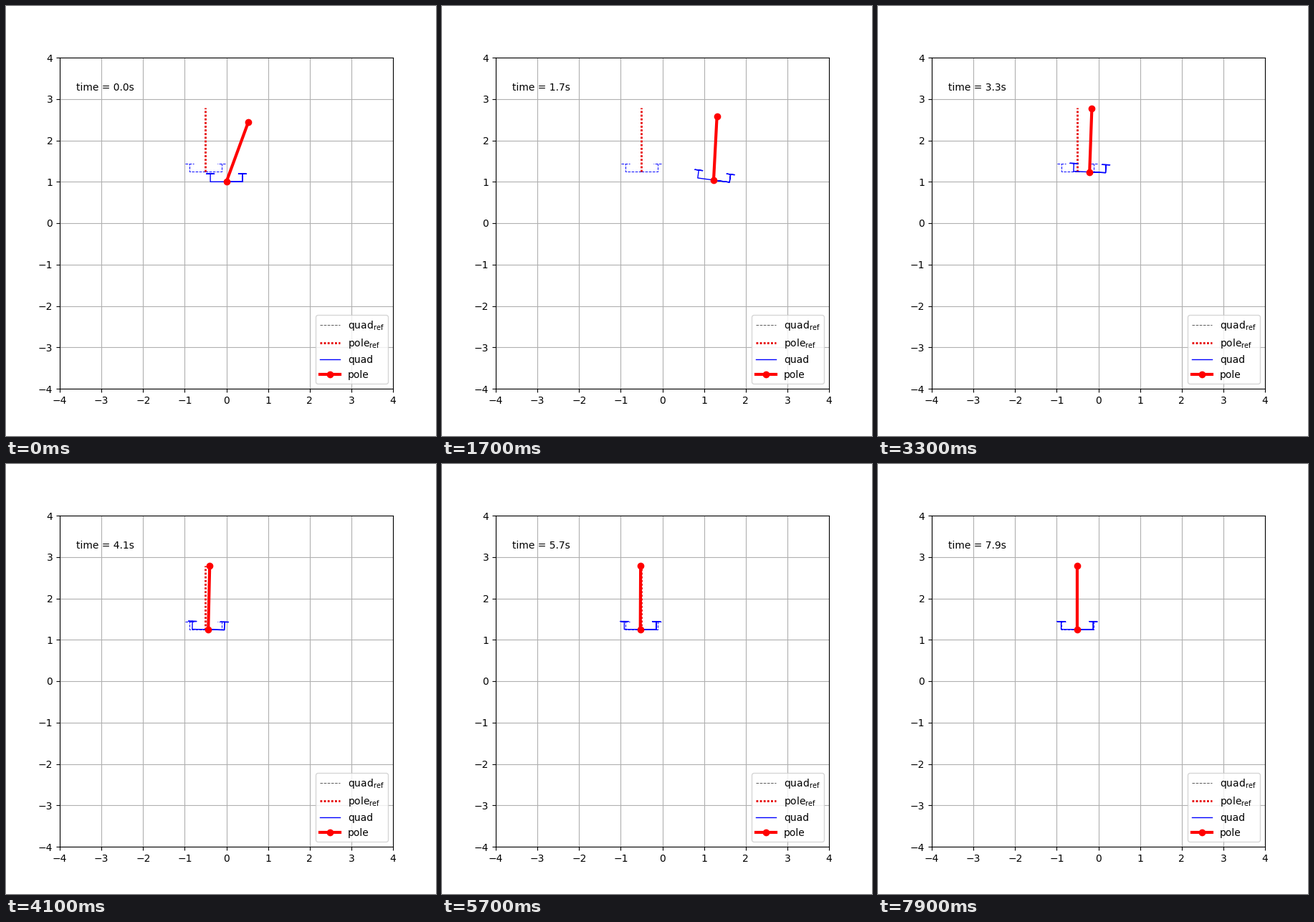
A matplotlib script for the animation above (8 s loop, 600 by 600 pixels).

```python
import numpy as np
import matplotlib.pyplot as plt
from matplotlib.animation import FuncAnimation
from matplotlib.lines import Line2D

FRAMES, STEP = 80, 0.1
GRAVITY = 9.8
ARM = 0.385          # half width of the quad
POLE = 4 * ARM
TARGET = (-0.5, 1.25)
T_SWING, T_SETTLE = 0.9, 1.7


def settle(t):
    """Damped approach to the target: x, z, pole angle."""
    s = t - T_SETTLE
    return np.array([
        TARGET[0] + 1.7 * np.exp(-0.85 * s) * np.cos(0.53 * s) + 0.03 * np.exp(-4 * s),
        TARGET[1] - 0.21 * np.exp(-1.67 * s),
        0.052 * np.exp(-(s / 2.6) ** 2),
    ])


def derivatives(f, t, h=1e-3):
    """Position, velocity and acceleration of f at t."""
    a, b, c = f(t - h), f(t), f(t + h)
    return b, (c - a) / (2 * h), (a - 2 * b + c) / h ** 2


def quintic(t, t0, t1, start, end):
    """Blend matching position, velocity and acceleration at both ends."""
    span = t1 - t0
    u = (t - t0) / span
    p0, v0, a0 = (np.asarray(k) * span ** n for n, k in enumerate(start))
    p1, v1, a1 = (np.asarray(k) * span ** n for n, k in enumerate(end))
    p, v, a = p1 - p0 - v0 - a0 / 2, v1 - v0 - a0, a1 - a0
    return (p0 + v0 * u + a0 / 2 * u ** 2
            + (10 * p - 4 * v + a / 2) * u ** 3
            + (7 * v - 15 * p - a) * u ** 4
            + (6 * p - 3 * v + a / 2) * u ** 5)


# position, velocity, acceleration of (x, z, pole angle)
START = (0, 1, 0.35), (0, 0, 0), (0, 0, 2)
SWING = (2.4, 0.78, -0.468), (1.2, 0.5, -0.1), (-9, 2.3, 5)
CATCH = derivatives(settle, T_SETTLE)


def pose(t):
    if t < T_SWING:
        return quintic(t, 0, T_SWING, START, SWING)
    if t < T_SETTLE:
        return quintic(t, T_SWING, T_SETTLE, SWING, CATCH)
    return settle(t)


def state(t):
    """The quad tilts so that its thrust gives the needed acceleration."""
    (x, z, angle), _, (ax, az, _) = derivatives(pose, t)
    return x, z, np.arctan2(-ax, GRAVITY + az), angle


def quad_xy(x, z, tilt):
    a, h, r = ARM, ARM / 2, ARM / 4
    px = np.array([0, a, a, a + r, a - r, a, a, 0, -a, -a, -a - r, -a + r, -a])
    pz = np.array([0, 0, h, h, h, h, 0, 0, 0, h, h, h, h])
    c, s = np.cos(tilt), np.sin(tilt)
    return x + c * px - s * pz, z + s * px + c * pz


def pole_xy(x, z, angle):
    return [x, x + POLE * np.sin(angle)], [z, z + POLE * np.cos(angle)]


fig, ax = plt.subplots(figsize=(6, 6), dpi=100)
ax.set(xlim=(-4, 4), ylim=(-4, 4), xticks=range(-4, 5), yticks=range(-4, 5))
ax.grid(True)

dashed = dict(ls="--", lw=0.7)
dotted = dict(color="#e60000", ls=(0, (1, 0.85)), lw=2)
solid = dict(color="b", ls="-", lw=1)
rod = dict(color="r", ls="-", lw=3, marker="o")

# each stroke once, so that dashes do not overlap
qx, qz = quad_xy(*TARGET, 0)
for part in (slice(0, 3), slice(3, 5), slice(7, 10), slice(10, 12)):
    ax.plot(qx[part], qz[part], color="b", **dashed)
ax.plot(*pole_xy(*TARGET, 0), **dotted)
quad, = ax.plot([], [], **solid)
pole, = ax.plot([], [], **rod)
clock = ax.text(0.05, 0.9, "", transform=ax.transAxes)

ax.legend(loc="lower right", handles=[
    Line2D([], [], color="0.35", label=r"quad$_{\mathrm{ref}}$", **dashed),
    Line2D([], [], label=r"pole$_{\mathrm{ref}}$", **dotted),
    Line2D([], [], label="quad", **solid),
    Line2D([], [], label="pole", **rod),
])


def update(i):
    t = i * STEP
    x, z, tilt, angle = state(t)
    quad.set_data(*quad_xy(x, z, tilt))
    pole.set_data(*pole_xy(x, z, angle))
    clock.set_text(f"time = {t:.1f}s")
    return quad, pole, clock


anim = FuncAnimation(fig, update, frames=FRAMES, interval=100,
                     repeat=True, repeat_delay=0)
plt.show()
```
